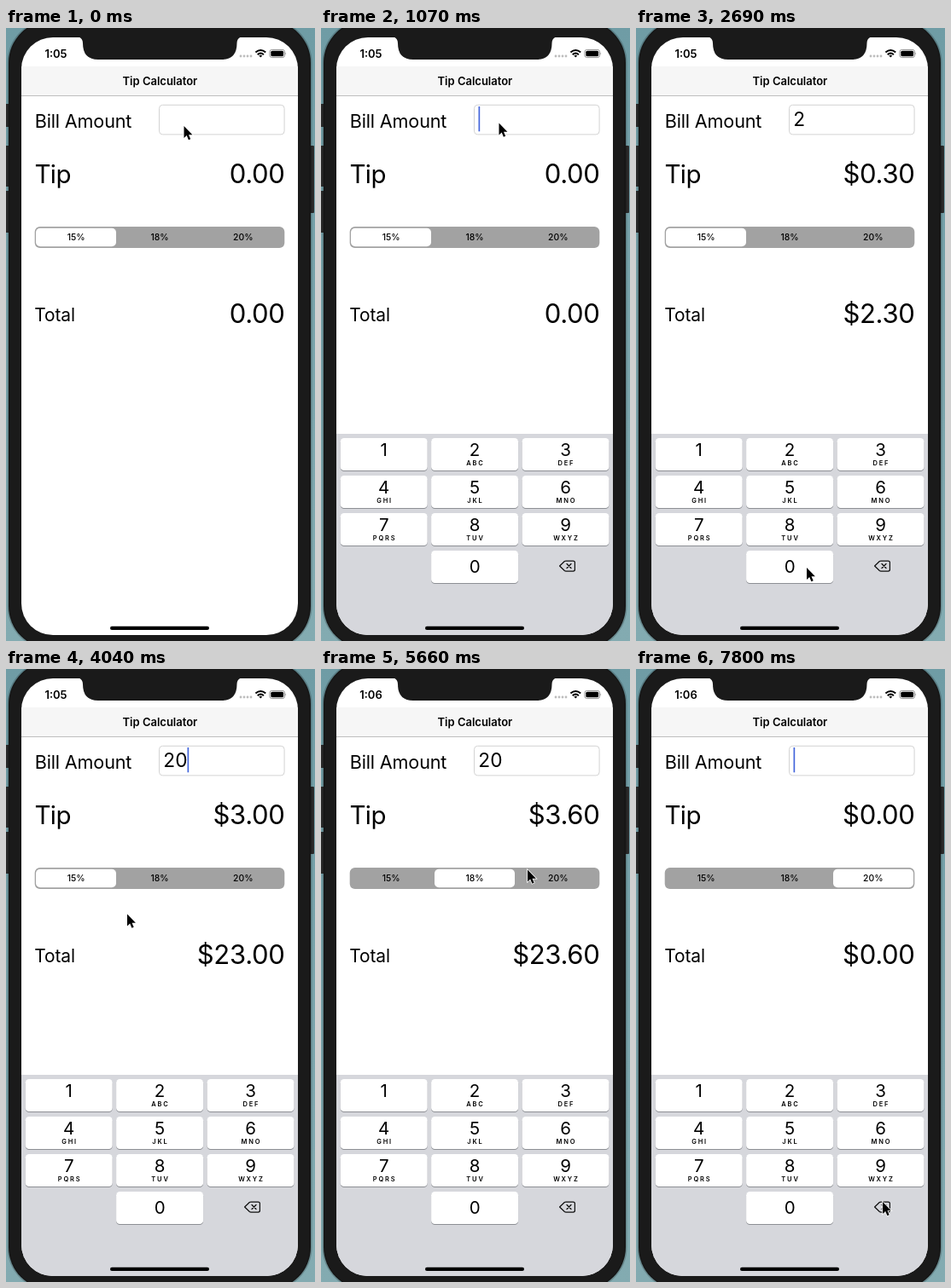
Animation, 362 px wide and 719 px high, one loop 8000 ms. Source, as an HTML page:

```html
<!DOCTYPE html>
<html lang="en">
<head>
<meta charset="utf-8">
<title>Tip Calculator</title>
<style>
  html, body { margin: 0; width: 100%; height: 100%; overflow: hidden; background: #7aa3ab; }
  svg { display: block; width: 100%; height: 100%; }
  text { font-family: Inter, Roboto, sans-serif; }
  .amount { font-size: 31px; letter-spacing: -.3px; text-anchor: end; }
  .mid { text-anchor: middle; }
  .bold { font-weight: 600; font-size: 13px; }
  .segment { font-size: 10.4px; font-weight: 500; }
  .digit { font-size: 20.5px; }
  .letters { font-size: 7.5px; font-weight: 600; letter-spacing: 1.8px; }
</style>
</head>
<body>
<svg viewBox="0 0 362 719">
  <defs>
    <clipPath id="screen"><rect x="18" y="11" width="324" height="701" rx="37"/></clipPath>
    <linearGradient id="desk" x2="0" y2="1">
      <stop stop-color="#6f9ca5"/><stop offset="1" stop-color="#83abb1"/>
    </linearGradient>
  </defs>

  <rect width="362" height="719" fill="url(#desk)"/>
  <g fill="#2b2b2b">
    <rect x="-2" y="89" width="8" height="27" rx="1"/>
    <rect x="-2" y="138" width="8" height="48" rx="1"/>
    <rect x="-2" y="191" width="8" height="49" rx="1"/>
    <rect x="354" y="138" width="7" height="79" rx="1"/>
  </g>
  <rect x="3" y="-9" width="354" height="737" rx="50" fill="#1a1a1a" stroke="#000" stroke-opacity=".2" stroke-width="3"/>

  <g clip-path="url(#screen)">
    <rect x="18" y="11" width="324" height="701" fill="#fff"/>
    <rect x="18" y="45" width="324" height="34.5" fill="#f6f6f6"/>
    <path d="M18 79.5H342" stroke="#b8b8b8" stroke-width=".9"/>
    <path d="M83 10Q90 11 90 18Q90 37 108 37H252.5Q270.5 37 270.5 18Q270.5 11 277.5 10Z" fill="#1a1a1a"/>

    <text id="clock" class="bold mid" x="58.5" y="34.7"></text>
    <path d="M275 33H288" stroke="#bdbdbd" stroke-width="2.8" stroke-linecap="round" stroke-dasharray="0 4"/>
    <g fill="none" stroke="#000" stroke-width="2">
      <path d="M292.4 28.6Q298.3 23.3 304.2 28.6M294.7 31.2Q298.3 28 301.9 31.2"/>
      <path d="M296.4 32.4Q298.3 31 300.2 32.4L298.3 34.4Z" fill="#000" stroke="none"/>
    </g>
    <rect x="308.9" y="25.4" width="17.6" height="9.2" rx="2.6" fill="none" stroke="#8a8a8a" stroke-width=".9"/>
    <rect x="310.3" y="26.8" width="14.8" height="6.4" rx="1.5"/>
    <path d="M327.5 28.4Q329 30 327.5 31.6Z" fill="#8a8a8a"/>

    <text class="bold mid" x="180.4" y="66.7">Tip Calculator</text>
    <text x="33.7" y="117" font-size="21.6" letter-spacing="-.15">Bill Amount</text>
    <text x="33.4" y="181.8" font-size="29.5" letter-spacing="-.6">Tip</text>
    <text x="33.3" y="343.8" font-size="20.9" letter-spacing="-.1">Total</text>

    <rect x="179.5" y="90.3" width="146.6" height="34.6" rx="4" fill="#fff" stroke="#d3d3d3"/>
    <text id="bill" x="184.3" y="115.3" font-size="22.7"></text>
    <rect id="caret" y="92" width="1.7" height="29.3" fill="#4466dc"/>
    <text id="tip" class="amount" x="326.5" y="182"></text>
    <text id="total" class="amount" x="326.5" y="346.2"></text>

    <rect x="33.7" y="233" width="292.6" height="25" rx="6" fill="#a2a2a2"/>
    <rect id="knob" y="234.7" width="94" height="21.5" rx="5" fill="#fff"/>
    <g id="segments"></g>

    <g id="keyboard">
      <rect x="18" y="476" width="324" height="290" fill="#d6d7dc"/>
      <g id="keys"></g>
      <g fill="none" stroke="#111" stroke-width="1.25" stroke-linejoin="round" stroke-linecap="round">
        <path d="M279.6 631L285.3 625.5Q286 625 287 625H295.4Q297.4 625 297.4 627V635Q297.4 637 295.4 637H287Q286 637 285.3 636.5Z"/>
        <path d="M288 628.5L293 633.5M293 628.5L288 633.5"/>
      </g>
    </g>
    <rect x="122" y="701.8" width="116" height="4.2" rx="2.1"/>
  </g>

  <path id="pointer" d="M0 0V14L3.2 11L5.4 16.2L7.7 15.2L5.5 10.2H9.9Z" stroke="#fff" stroke-width="1.5" paint-order="stroke"/>
</svg>
<script>
  // The picture holds for one beat; all event times below are counted in beats.
  const LOOP = 8000, FIRST = 260, BEAT = 269.2;
  const FOCUS = 2.6, TYPED = [8, 11], PICKED = [17, 24], DELETED = [28, 29], MINUTE = 18;
  const RATES = [15, 18, 20];

  // Pointer journeys: beat of leaving, beat of arriving, destination.
  const JOURNEYS = [
    [0, 3, 208.5, 111.5],
    [4, 7, 188, 499.5],    // key 2
    [8, 10, 200, 633],     // key 0
    [12, 15, 142, 287.5],
    [15, 17, 178, 241],    // 18%
    [20, 21, 242, 235.5],
    [21, 23, 250, 238],    // 20%
    [24, 26, 337, 651],
    [26, 27, 289, 625]     // delete
  ];

  const $ = id => document.getElementById(id);
  const clamp = v => Math.max(0, Math.min(1, v));
  const ease = (from, to, beat) => {
    const p = clamp((beat - from) / (to - from));
    return p * p * (3 - 2 * p);
  };
  const countPast = (events, beat) => events.filter(e => e <= beat).length;
  const label = (cls, x, y, text) => `<text class="${cls} mid" x="${x}" y="${y}">${text}</text>`;

  $("segments").innerHTML = RATES.map((r, i) => label("segment", 82.2 + 97.8 * i, 249, r + "%")).join("");

  const LETTERS = ["", "ABC", "DEF", "GHI", "JKL", "MNO", "PQRS", "TUV", "WXYZ", ""];
  $("keys").innerHTML = LETTERS.map((letters, i) => {
    const column = i < 9 ? i % 3 : 1, row = Math.floor(i / 3);
    const x = 22.7 + 106.4 * column, y = 481 + 44 * row, center = x + 51;
    const box = (dy, fill) => `<rect x="${x}" y="${y + dy}" width="102" height="38" rx="4.3" fill="${fill}"/>`;
    return box(1, "#8d8f94") + box(0, "#fff") +
      label("digit", center, y + (letters || !i ? 20.6 : 25.6), (i + 1) % 10) +
      label("letters", center + .9, y + 32, letters);
  }).join("");

  function pointerAt(beat) {
    let x = 208.5, y = 115;
    for (const [leave, arrive, toX, toY] of JOURNEYS) {
      const p = ease(leave, arrive, beat);
      x += (toX - x) * p;
      y += (toY - y) * p;
    }
    return [x, y];
  }

  // Blinks once a second, starting over at every key press.
  function caretOpacity(beat) {
    if (beat < FOCUS) return 0;
    const restart = Math.max(...[FOCUS, ...TYPED, ...DELETED].filter(e => e <= beat));
    const phase = (beat - restart) * BEAT / 1000 % 1;
    return clamp((.53 - phase) / .06);
  }

  function draw(time) {
    const beat = Math.max(0, Math.floor((time % LOOP - FIRST) / BEAT) + 1);
    const bill = "20".slice(0, countPast(TYPED, beat) - countPast(DELETED, beat));
    const segment = countPast(PICKED, beat);
    const tip = bill * RATES[segment] / 100;
    const money = value => (beat < TYPED[0] ? "" : "$") + value.toFixed(2);

    $("clock").textContent = beat < MINUTE ? "1:05" : "1:06";
    $("bill").textContent = bill;
    $("tip").textContent = money(tip);
    $("total").textContent = money(+bill + tip);
    $("caret").setAttribute("x", 184.5 + 14 * bill.length);
    $("caret").setAttribute("opacity", caretOpacity(beat));
    $("knob").setAttribute("x", 35 + 98 * segment);
    $("keyboard").setAttribute("transform", `translate(0 ${240 * (1 - ease(2, 3.43, beat))})`);
    $("pointer").setAttribute("transform", `translate(${pointerAt(beat)})`);
  }

  const began = performance.now();
  function frame() {
    draw(performance.now() - began);
    requestAnimationFrame(frame);
  }
  frame();
</script>
</body>
</html>
```
